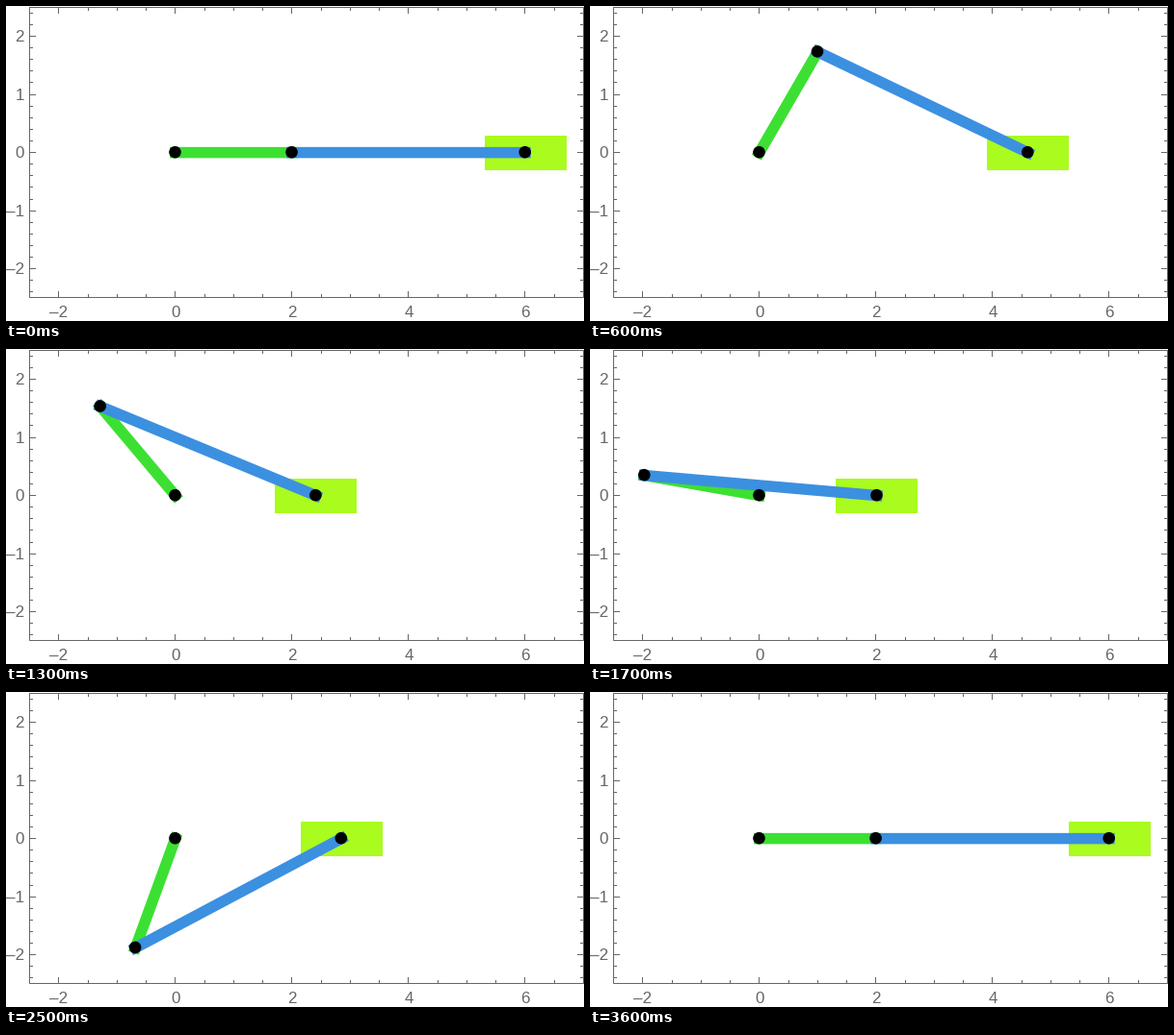
Animation, 600 px wide and 328 px high, one loop 3700 ms. Source, as a matplotlib script:

```python
import numpy as np
import matplotlib.pyplot as plt
from matplotlib.animation import FuncAnimation
from matplotlib.patches import Circle, Rectangle

W, H, DPI = 600, 328, 64
PT = 72 / DPI                      # points per pixel
X0, Y0, UNIT = 175.8, 152.6, 60.53
CRANK, ROD = 2, 4
FRAMES, INTERVAL = 37, 100
GRAY, GREEN, BLUE, LIME = "#666666", "#3ce032", "#3c90e0", "#aafb1e"

plt.rcParams["font.family"] = "Liberation Sans"
fig = plt.figure(figsize=(W / DPI, H / DPI), dpi=DPI, facecolor="white")
ax = fig.add_axes([0, 0, 1, 1])
ax.set(xlim=(0, W), ylim=(H, 0))
ax.axis("off")


def px(x):
    return X0 + UNIT * x


def py(y):
    return Y0 - UNIT * y


def mid(v):
    """Centre of the pixel that holds v."""
    return np.floor(v) + 0.5


def hairline(xs, ys):
    ax.plot(xs, ys, color=GRAY, lw=PT, solid_capstyle="projecting",
            solid_joinstyle="miter", snap=False, zorder=5)


def label(x, y, value, ha):
    text = str(value).replace("-", "\u2013")
    ax.text(x, y, text, ha=ha, va="baseline", color=GRAY, fontsize=17 * PT)


def draw_frame():
    left, right = mid(px(-2.5)), mid(px(7))
    top, bottom = mid(py(2.5)), mid(py(-2.5))
    hairline([left, right, right, left, left], [top, top, bottom, bottom, top])

    for k in range(-4, 14):
        x = mid(px(k / 2))
        size = 6 if k % 4 == 0 else 3
        hairline([x, x], [bottom, bottom - size])
        hairline([x, x], [top, top + size])
        if k % 4 == 0:
            label(x + 0.5, 324, k // 2, "center")

    for k in range(-12, 13):
        y = mid(py(k / 5))
        size = 6 if k % 5 == 0 else 3
        hairline([left, left + size], [y, y])
        hairline([right, right - size], [y, y])
        if k % 5 == 0:
            label(19, y + 5.5, k // 5, "right")


def bar(color, z):
    return ax.plot([], [], color=color, lw=11.5 * PT, snap=False,
                   solid_capstyle="projecting", zorder=z)[0]


draw_frame()
slider = ax.add_patch(Rectangle((0, 0), 85, 36, fc=LIME, lw=0, zorder=1))
crank, rod = bar(GREEN, 2), bar(BLUE, 3)
joints = [ax.add_patch(Circle((0, 0), 6.3, fc="black", lw=0, zorder=4))
          for _ in range(3)]


def update(i):
    a = np.radians(10 * i)
    cx, cy = CRANK * np.cos(a), CRANK * np.sin(a)
    sx = cx + np.sqrt(ROD**2 - cy**2)
    pts = [(X0, Y0), (px(cx), py(cy)), (px(sx), Y0)]
    crank.set_data(*zip(*pts[:2]))
    rod.set_data(*zip(*pts[1:]))
    slider.set_xy((round(px(sx - 0.7)), 135))
    for joint, (x, y) in zip(joints, pts):
        joint.center = (x - 0.3, y - 0.4)
    return [slider, crank, rod, *joints]


anim = FuncAnimation(fig, update, frames=FRAMES, interval=INTERVAL,
                     repeat=True, repeat_delay=0)
plt.show()
```
